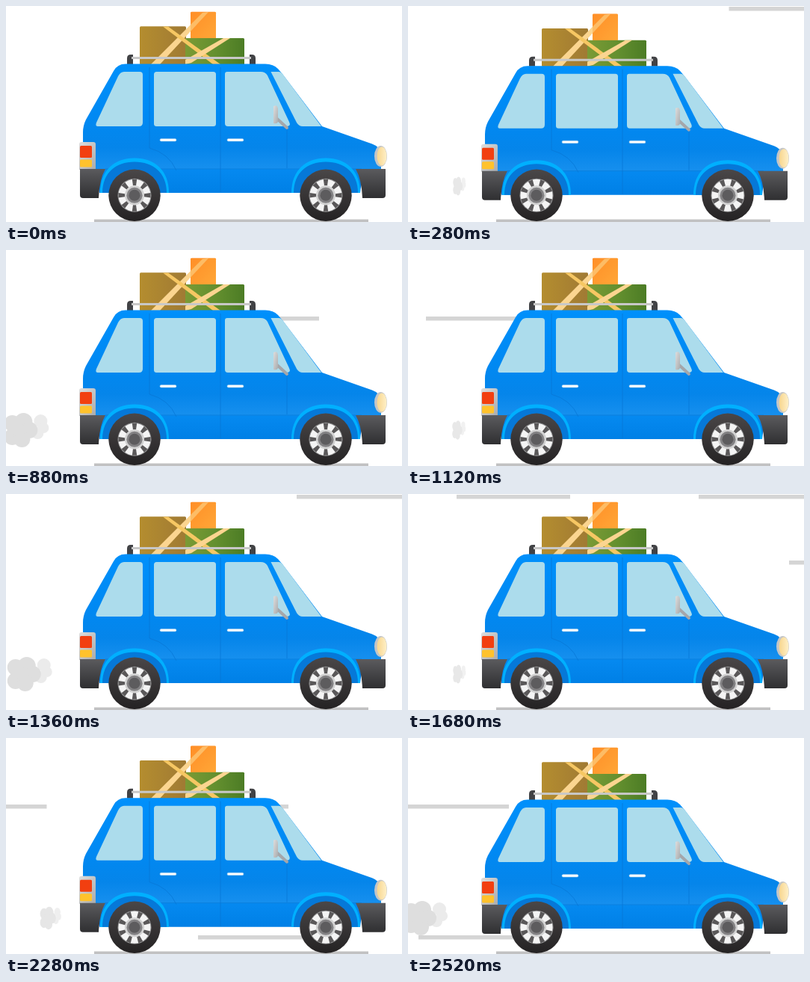
These frames come from a looping animation (530x289 px, 2560 ms). An HTML page:

```html
<!DOCTYPE html>
<html lang="en">
<head>
<meta charset="utf-8">
<title>Family car on the road</title>
<style>
html, body { margin: 0; width: 100%; height: 100%; overflow: hidden; background: #fff; }
svg { display: block; width: 100vw; height: 100vh; }
</style>
</head>
<body>
<svg viewBox="0 0 530 289" preserveAspectRatio="none">
  <defs>
    <linearGradient id="paint" x1="0" y1="0" x2="0" y2="1">
      <stop offset="0" stop-color="#0090fb"/>
      <stop offset=".4" stop-color="#0089f3"/>
      <stop offset=".65" stop-color="#0585ea"/>
      <stop offset=".81" stop-color="#168fee"/>
      <stop offset=".82" stop-color="#0589f0"/>
      <stop offset="1" stop-color="#0080e6"/>
    </linearGradient>
    <linearGradient id="brown">
      <stop offset="0" stop-color="#b48d2f"/><stop offset="1" stop-color="#a07a34"/>
    </linearGradient>
    <linearGradient id="green">
      <stop offset="0" stop-color="#7b9a35"/><stop offset=".5" stop-color="#64902f"/><stop offset="1" stop-color="#4c7c25"/>
    </linearGradient>
    <linearGradient id="orange" x1="0" y1="0" x2="1" y2="1">
      <stop offset="0" stop-color="#ff8220"/><stop offset="1" stop-color="#ffae3c"/>
    </linearGradient>
    <linearGradient id="rubber" x1="0" y1="0" x2="0" y2="1">
      <stop offset="0" stop-color="#5b5b5e"/><stop offset="1" stop-color="#2f2f31"/>
    </linearGradient>
    <linearGradient id="tyre" x1="0" y1="0" x2="0" y2="1">
      <stop offset="0" stop-color="#4a4748"/><stop offset="1" stop-color="#242223"/>
    </linearGradient>
    <linearGradient id="silver" x1="0" y1="0" x2="1" y2="1">
      <stop offset="0" stop-color="#dedede"/><stop offset="1" stop-color="#a9abad"/>
    </linearGradient>
    <linearGradient id="lamp">
      <stop offset="0" stop-color="#f7d58c"/><stop offset="1" stop-color="#fff0c8"/>
    </linearGradient>
    <g id="arch">
      <path d="M-46 2C-46 -28 -27 -44.500 0 -44.500S46 -28 46 2Z" fill="#00b0ff"/>
      <path d="M-43 2C-43 -25 -25 -39.500 0 -39.500S43 -25 43 2Z" fill="#0678d8"/>
    </g>
    <g id="puff">
      <g fill="#ebebeb">
        <circle cx="20" cy="-12" r="9"/><circle cx="24" cy="-3" r="7"/><circle cx="16" cy="4" r="8"/>
      </g>
      <g fill="#dedede">
        <circle cx="-18" cy="-9" r="11"/><circle cx="-3" cy="-11" r="12"/><circle cx="5" cy="0" r="11"/>
        <circle cx="-18" cy="9" r="11"/><circle cx="-5" cy="12" r="11"/><circle cx="-9" cy="0" r="9"/>
      </g>
    </g>
  </defs>
  <rect width="530" height="289" fill="#fff"/>
  <g id="streaks" fill="#d5d5d5"></g>
  <g id="smoke"></g>
  <rect x="118" y="285.5" width="367" height="3.5" fill="#c1c1c2"/>

  <g id="body">
    <!-- luggage -->
    <rect x="247" y="7.700" width="34" height="36" rx="1.5" fill="url(#orange)"/>
    <rect x="179" y="27.300" width="62" height="51" rx="1.5" fill="url(#brown)"/>
    <rect x="240" y="43" width="79" height="36" rx="1.5" fill="url(#green)"/>
    <g fill="#fbd590">
      <path d="M263 9L271 8L206 78H194Z"/>
      <path d="M210 27.500H217L287 78H277Z" fill="#f6c763"/>
      <path d="M291 43H300L248 76L240 78V72Z"/>
    </g>
    <path d="M247 8H281V43H247Z" fill="#ff9d31" opacity=".45"/>

    <!-- roof rack -->
    <path d="M162 78V70Q162 65 167 65H170V78ZM334 78V70Q334 65 329 65H326V78Z" fill="#414245"/>
    <rect x="168" y="68" width="160" height="3" fill="#c8c8c8"/>

    <path fill="url(#paint)" d="M103 219V169Q103 160 107 152L144 87Q149 77.500 160 77.500H347Q358 77.500 364 84L370 91L423 161L490 184.500Q500 188 502 198V219L478 219L474 250H125L122 219Z"/>
    <path d="M133 218H476" stroke="#0a7cd8" stroke-width=".8"/>
    <g fill="none" stroke="#0878d6" stroke-width=".8">
      <path d="M192 82V190Q218 197 228 220"/>
      <path d="M287 82V249M376 161V217"/>
    </g>

    <!-- windows -->
    <g fill="#acdcec">
      <path d="M158 88H179Q183 88 183 92V156Q183 161 178 161H123Q119 161 121 156L150 94Q153 88 158 88Z"/>
      <rect x="198" y="88" width="83" height="73" rx="3.5"/>
      <path d="M296 88H341Q347 88 350 93L379 155Q382 161 375 161H297Q293 161 293 157V91Q293 88 296 88Z"/>
      <path d="M354.500 88H365Q368 88 371 92L422 161H397Q392 161 389 156Z"/>
    </g>
    <path d="M363 151L376 163" stroke="#a4a6aa" stroke-width="4" stroke-linecap="round"/>
    <path d="M358 134Q364 131 364 139V155Q363 158 358 157Z" fill="url(#silver)"/>
    <g fill="#fff" stroke="#86bfe9" stroke-width=".6">
      <rect x="206" y="177.500" width="22" height="3.500" rx="1.7"/>
      <rect x="296" y="177.500" width="22" height="3.500" rx="1.7"/>
    </g>

    <!-- lights -->
    <path d="M98 185Q98 182 101 182H117Q120 182 120 185V219H98Z" fill="url(#silver)"/>
    <rect x="99" y="187" width="16" height="16" rx="1.5" fill="#f23f10"/>
    <rect x="99" y="205.500" width="16" height="10" rx="1.5" fill="#ffc22c"/>

    <!-- bumpers -->
    <path d="M99 218H133Q125 232 124 257H103Q99 257 99 253Z" fill="url(#rubber)"/>
    <path d="M468 218H508V253Q508 257 504 257H477Q476 232 468 218Z" fill="url(#rubber)"/>
    <use href="#arch" x="172" y="248"/>
    <use href="#arch" x="428" y="248"/>
    <ellipse cx="501.500" cy="201" rx="8.500" ry="14" fill="#c3c5c7"/>
    <ellipse cx="503" cy="201" rx="6.500" ry="12.500" fill="url(#lamp)"/>
  </g>
  <g id="wheels"></g>
</svg>
<script>
const LOOP = 2560, STEP = 40, SPEED = 40.5;
const NS = "http://www.w3.org/2000/svg";
const $ = id => document.getElementById(id);

function add(parent, tag, attrs) {
  const el = document.createElementNS(NS, tag);
  for (const k in attrs) el.setAttribute(k, attrs[k]);
  parent.appendChild(el);
  return el;
}

// Each streak: height on stage, and the step and x of one point on its path.
const streaks = [
  [1, 8, 389], [1, 34, 389], [1, 42, 389],
  [89, 22, 267], [89, 42, 510], [89, 51, 469],
  [264, 51, 500]
].map(([y, step, x]) => ({
  step, x, el: add($("streaks"), "rect", { y, width: 152, height: 5.5 })
}));

const puffs = [5.8, 14, 26.7, 40.8, 54.3].map(birth => ({
  birth, el: add($("smoke"), "use", { href: "#puff" })
}));

const spinners = [172, 428].map(cx => {
  const g = add($("wheels"), "g", { transform: `translate(${cx} 253.3)` });
  add(g, "circle", { r: 34.7, fill: "url(#tyre)" });
  add(g, "circle", { r: 22.5, fill: "#8c8c8d" });
  const rim = add(g, "g", {});
  add(rim, "circle", { r: 21.5, fill: "#f4f4f4" });
  for (let i = 0; i < 8; i++)
    add(rim, "path", { d: "M-2 -13L-3.200 -21.500H3.200L2 -13Z", fill: "#5a5859", transform: `rotate(${i * 45})` });
  add(g, "circle", { r: 13, fill: "#d2d2d2" });
  add(g, "circle", { r: 10.5, fill: "#838284" });
  add(g, "circle", { r: 7.5, fill: "#5d5c5e" });
  return rim;
});

// Body rests 3px low and rattles as the loop comes round.
function bob(t) {
  const d = t > LOOP / 2 ? t - LOOP : t;
  return 3 - 3 * Math.exp(-Math.abs(d) / 250) * Math.cos(2 * Math.PI * d / 100);
}

function draw(time) {
  const n = Math.floor((time % LOOP) / STEP);
  $("body").setAttribute("transform", `translate(0 ${bob(n * STEP).toFixed(2)})`);
  for (const s of streaks) s.el.setAttribute("x", s.x - (n - s.step) * SPEED);
  for (const rim of spinners) rim.setAttribute("transform", `rotate(${n * 22.5})`);
  for (const p of puffs) {
    const age = n - p.birth;
    const grow = Math.min(1, Math.max(0, age / 7));
    const x = 76 - 6.2 * age, sx = 0.14 + 0.86 * grow, sy = 0.45 + 0.55 * grow;
    p.el.setAttribute("transform", `translate(${x} 241) scale(${sx} ${sy})`);
    p.el.setAttribute("opacity", 0.6 + 0.4 * grow);
    p.el.setAttribute("visibility", age >= -0.5 && age < 14 ? "visible" : "hidden");
  }
}

const start = performance.now();
function tick() {
  draw(performance.now() - start);
  requestAnimationFrame(tick);
}
draw(0);
requestAnimationFrame(tick);
</script>
</body>
</html>
```
